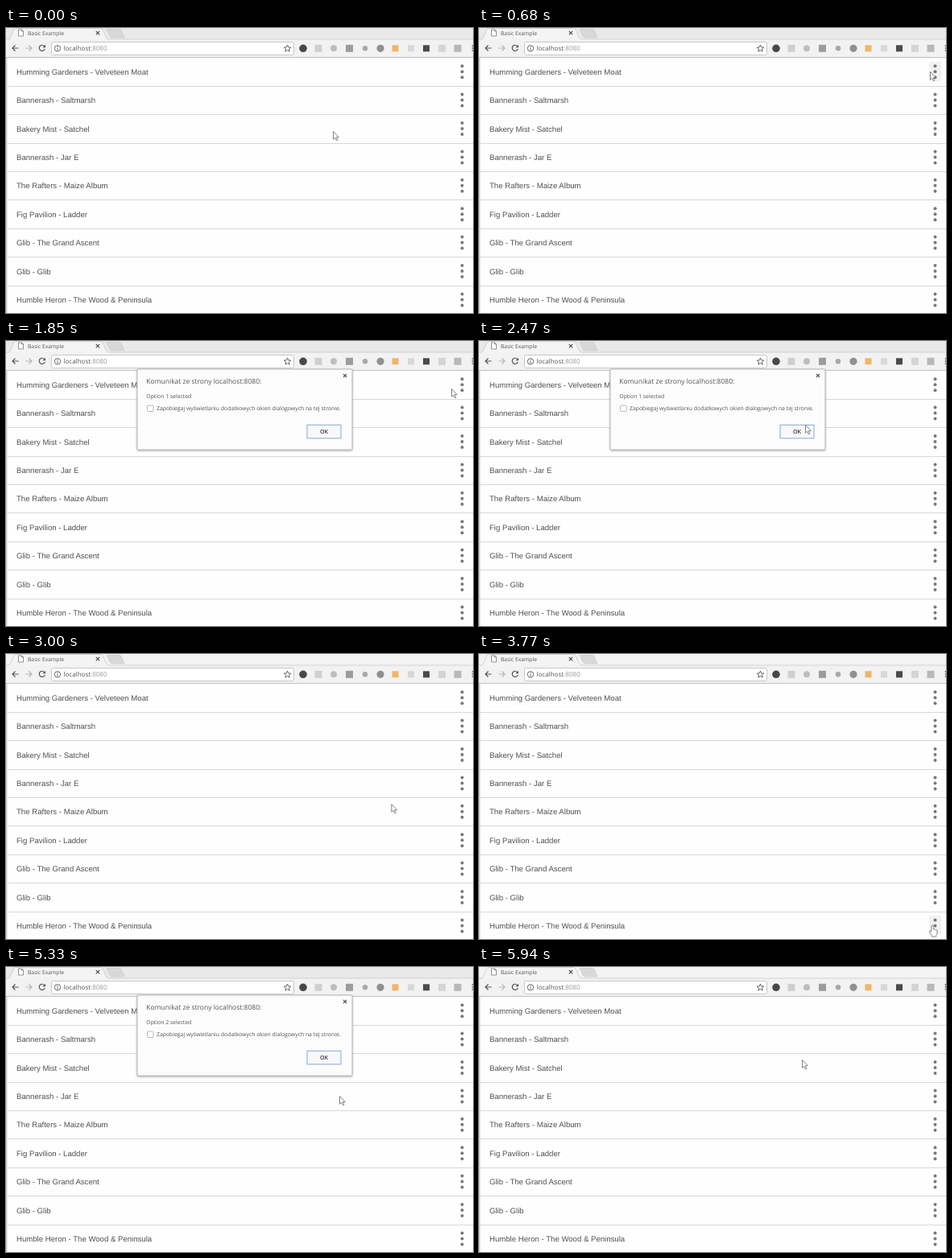
Recreate the animation shown at these times as an HTML page. Size 580 by 354 pixels, loop 6.26 s.

```html
<!DOCTYPE html>
<html lang="en">
<head>
<meta charset="utf-8">
<title>Basic Example</title>
<style>
html, body { margin: 0; width: 100%; height: 100%; overflow: hidden; background: #fff; }
svg { display: block; width: 580px; height: 354px; }
text { text-rendering: geometricPrecision; white-space: pre; }
.page { font: 9.6px "Liberation Sans", Arial, sans-serif; fill: #505050; }
.ui { font: 6.86px "Open Sans", "Noto Sans", sans-serif; fill: #555; }
.line { fill: none; stroke: #555; stroke-width: 1.2; }
.crisp { shape-rendering: crispEdges; }

.strip, .cursor, .arrow, .hand, .hover1, .hover2, .menu1, .menu2, .pick1, .pick2, .dialog, .first, .second {
  animation: 6260ms step-end infinite;
}
.strip { animation-name: strip; }
.cursor { animation-name: cursor; }
.arrow { animation-name: arrow; }
.hand { animation-name: hand; }
.hover1 { animation-name: hover1; }
.hover2 { animation-name: hover2; }
.menu1 { animation-name: menu1; }
.menu2 { animation-name: menu2; }
.pick1 { animation-name: pick1; }
.pick2 { animation-name: pick2; }
.dialog { animation-name: dialog; }
.first { animation-name: first; }
.second { animation-name: second; }

@keyframes strip {
  0%, 29.55%, 80.03% { fill: #e9e9e9; }
  14.53%, 42.01%, 90.09%, 100% { fill: #f3f3f3; }
}
@keyframes cursor {
  0% { transform: translate(406px, 128px); }
  2.07% { transform: translate(406px, 128px); animation-timing-function: steps(7, jump-both); }
  10.86% { transform: translate(560px, 54px); }
  12.14% { transform: translate(560px, 55px); }
  20.6% { transform: translate(558px, 55px); animation-timing-function: steps(4, jump-end); }
  25.55% { transform: translate(553px, 59px); }
  30.67% { transform: translate(553px, 59px); animation-timing-function: steps(6, jump-both); }
  38.17% { transform: translate(411px, 109px); }
  39.45% { transform: translate(405px, 104px); }
  43.13% { transform: translate(405px, 104px); animation-timing-function: steps(5, jump-both); }
  49.2% { transform: translate(515px, 227px); }
  50.47% { transform: translate(515px, 227px); animation-timing-function: steps(8, jump-both); }
  60.22% { transform: translate(563px, 337px); }
  69% { transform: translate(563px, 337px); animation-timing-function: steps(3, jump-both); }
  72.68% { transform: translate(541px, 337px); }
  80.03% { transform: translate(541px, 337px); animation-timing-function: steps(4, jump-both); }
  85.14% { transform: translate(414px, 160px); animation-timing-function: steps(2, jump-end); }
  87.54% { transform: translate(399px, 115px); }
  91.37%, 100% { transform: translate(401px, 115px); }
}
@keyframes arrow {
  0%, 29.55%, 80.03%, 100% { visibility: visible; }
  12.14%, 58.94% { visibility: hidden; }
}
@keyframes hand {
  0%, 29.55%, 80.03%, 100% { visibility: hidden; }
  12.14%, 58.94% { visibility: visible; }
}
@keyframes hover1 {
  0%, 16.93%, 100% { visibility: hidden; }
  10.86% { visibility: visible; }
}
@keyframes hover2 {
  0%, 63.89%, 100% { visibility: hidden; }
  58.94% { visibility: visible; }
}
@keyframes menu1 {
  0%, 28.27%, 100% { visibility: hidden; }
  16.93% { visibility: visible; }
}
@keyframes menu2 {
  0%, 78.75%, 100% { visibility: hidden; }
  63.89% { visibility: visible; }
}
@keyframes pick1 {
  0%, 28.27%, 100% { fill: #808080; }
  20.6% { fill: #646464; }
}
@keyframes pick2 {
  0%, 78.75%, 100% { fill: #808080; }
  69% { fill: #646464; }
}
@keyframes dialog {
  0%, 42.01%, 90.09%, 100% { visibility: hidden; }
  29.55%, 80.03% { visibility: visible; }
}
@keyframes first {
  0%, 42.01%, 100% { visibility: hidden; }
  29.55% { visibility: visible; }
}
@keyframes second {
  0%, 90.09%, 100% { visibility: hidden; }
  80.03% { visibility: visible; }
}
</style>
</head>
<body>
<svg viewBox="0 0 580 354" xmlns="http://www.w3.org/2000/svg">
  <defs>
    <g id="dots" fill="#787878">
      <circle cy="-7" r="2"/><circle r="2"/><circle cy="7" r="2"/>
    </g>
    <filter id="shade" x="-10%" y="-10%" width="120%" height="125%">
      <feDropShadow dx="0" dy="1" stdDeviation="1" flood-opacity=".35"/>
    </filter>
  </defs>
  <rect width="580" height="354" fill="#fefefe"/>

  <!-- browser frame -->
  <rect class="strip" width="580" height="15"/>
  <path d="M125 1.500H141Q142.500 1.500 143.200 3L147 12H132Q130 12 129 10Z" fill="#d8d8d8" stroke="#c6c6c6" stroke-width=".6"/>
  <rect y="14" width="580" height="22" fill="#f2f2f2"/>
  <path d="M0 14H3Q5 14 6 11L9.500 2Q10 .5 12 .5H117Q119 .5 120 2L124 11Q125 14 128 14H580" fill="#f4f4f4" stroke="#cacaca" stroke-width=".8"/>
  <path d="M15.500 2H19.500L21.500 4V10H15.500ZM19.500 2V4H21.500" fill="#fff" stroke="#777" stroke-width=".8"/>
  <text class="ui" x="27" y="8.600" style="font-size:6.76px">Basic Example</text>
  <path class="line" d="M111.800 4L116.200 8.400M116.200 4L111.800 8.400" stroke-width="1"/>
  <path class="line" d="M15.500 25H8M11.500 21.500L8 25L11.500 28.500"/>
  <path class="line" d="M24.500 25H32M28.500 21.500L32 25L28.500 28.500" style="stroke:#b5b5b5"/>
  <path class="line" d="M47.700 22.600A3.600 3.600 0 1 0 48.300 26"/>
  <path d="M49 20.800V24.300H45.500Z" fill="#555"/>
  <rect x="56.500" y="17.500" width="301" height="16" rx="2" fill="#fff" stroke="#c8c8c8"/>
  <circle class="line" cx="64" cy="25.300" r="3.700" style="stroke-width:.9"/>
  <path class="line" d="M64 24.800V27.500M64 23V24" style="stroke-width:1"/>
  <text class="ui" x="71.500" y="28.100" style="font-size:8px">localhost<tspan fill="#999">:8080</tspan></text>
  <path class="line" d="M349.500 21L350.700 23.900L353.800 24.100L351.400 26.100L352.200 29.200L349.500 27.500L346.800 29.200L347.600 26.100L345.200 24.100L348.300 23.900Z" style="stroke-width:.9"/>
  <g id="addons"></g>
  <g fill="#777"><circle cx="579.500" cy="22" r="1"/><circle cx="579.500" cy="25" r="1"/><circle cx="579.500" cy="28" r="1"/></g>
  <rect class="crisp" y="36" width="580" height="1" fill="#c0c0c0"/>
  <rect y="37" width="1.500" height="317" fill="#cfcfcf"/>

  <!-- list -->
  <g class="hover1"><rect x="559" y="42" width="15" height="24" fill="#f1f1f1"/></g>
  <g class="hover2"><rect x="559" y="325" width="15" height="24" fill="#f1f1f1"/></g>
  <g id="rows" class="page"></g>

  <!-- option menus -->
  <g class="menu1 page">
    <rect x="520" y="42" width="54" height="58" fill="#808080" filter="url(#shade)"/>
    <rect class="pick1" x="520" y="42" width="54" height="29"/>
    <rect class="crisp" x="520" y="71" width="54" height="1" fill="#929292"/>
    <text x="528.700" y="59.500" fill="#fff">Option 1</text>
    <text x="528.700" y="88.700" fill="#fff">Option 2</text>
  </g>
  <g class="menu2 page">
    <rect x="520" y="291" width="54" height="58" fill="#808080" filter="url(#shade)"/>
    <rect class="pick2" x="520" y="321" width="54" height="28"/>
    <rect class="crisp" x="520" y="320" width="54" height="1" fill="#929292"/>
    <text x="528.700" y="308.600" fill="#fff">Option 1</text>
    <text x="528.700" y="337.800" fill="#fff">Option 2</text>
  </g>

  <!-- alert -->
  <g class="dialog ui">
    <rect x="163" y="35" width="267" height="100" rx="1" fill="#fcfcfc" stroke="#b4b4b4" filter="url(#shade)"/>
    <text x="174.300" y="52.500" style="font-size:8.5px">Komunikat ze strony localhost:8080:</text>
    <path class="line" d="M419 41L423 45M423 41L419 45"/>
    <rect x="175.500" y="80" width="7.500" height="7.500" rx="1" fill="#fff" stroke="#b0b0b0" stroke-width=".9"/>
    <text x="187" y="86.200">Zapobiegaj wyświetlaniu dodatkowych okien dialogowych na tej stronie.</text>
    <rect x="374" y="104.300" width="42" height="16.500" fill="#f8f8fb" stroke="#9cb4dc" stroke-width="1.2"/>
    <text x="395" y="115" text-anchor="middle" style="font-size:7px;font-weight:600;fill:#333044">OK</text>
  </g>
  <text class="ui first" x="174.300" y="70.500">Option 1 selected</text>
  <text class="ui second" x="174.300" y="70.500">Option 2 selected</text>

  <g class="cursor" fill="#fff" stroke="#666" stroke-width=".8" stroke-linejoin="round">
    <path class="arrow" d="M.5.5V10.200L2.700 8.200L4.300 11.800L5.900 11.100L4.300 7.600H7.200Z"/>
    <path class="hand" d="M-1.200 8V1.200Q-1.200 0 0 0T1.200 1.200V5Q2.200 4.300 3 5.300Q4 4.800 4.600 5.800Q6 5.500 6 7V10Q5.500 11.500 4.800 12.500V14H-.5V12.800Q-2.500 10.500-3.500 8.200Q-3.600 6.500-2.300 7Z"/>
  </g>
</svg>
<script>
const titles = [
  "Humming Gardeners - Velveteen Moat", "Bannerash - Saltmarsh", "Bakery Mist - Satchel",
  "Bannerash - Jar E", "The Rafters - Maize Album", "Fig Pavilion - Ladder",
  "Glib - The Grand Ascent", "Glib - Glib", "Humble Heron - The Wood & Peninsula"
];
const rowHeight = 35.4;

function add(parent, tag, attrs, text = "") {
  const el = document.createElementNS("http://www.w3.org/2000/svg", tag);
  for (const key in attrs) el.setAttribute(key, attrs[key]);
  el.textContent = text;
  parent.append(el);
}

const rows = document.getElementById("rows");
titles.forEach((title, i) => {
  const y = 54 + i * rowHeight;
  add(rows, "text", { x: 13, y: y + 3.8 }, title);
  add(rows, "use", { href: "#dots", x: 566.5, y: y + 0.2 });
  add(rows, "rect", { class: "crisp", x: 1, y: Math.floor(y + 18.25), width: 579, height: 1, fill: "#d8d8d8" });
});

// toolbar buttons as plain shapes
const addons = document.getElementById("addons");
const disc = (cx, r, fill) => add(addons, "circle", { cx, cy: 25.3, r, fill });
const tile = (cx, size, fill) =>
  add(addons, "rect", { x: cx - size / 2, y: 25.3 - size / 2, width: size, height: size, fill });
disc(369, 4.8, "#484848");
tile(388, 9, "#cfcfcf");
disc(407, 4, "#bdbdbd");
tile(426.5, 9, "#9c9c9c");
disc(446, 3.2, "#a8a8a8");
disc(465, 4.6, "#909090");
tile(483.5, 8, "#efb668");
tile(503, 8, "#d8d8d8");
tile(522, 8, "#4a4a46");
tile(541.5, 9, "#d4d4d4");
tile(561, 9, "#b8b8b8");
</script>
</body>
</html>
```
